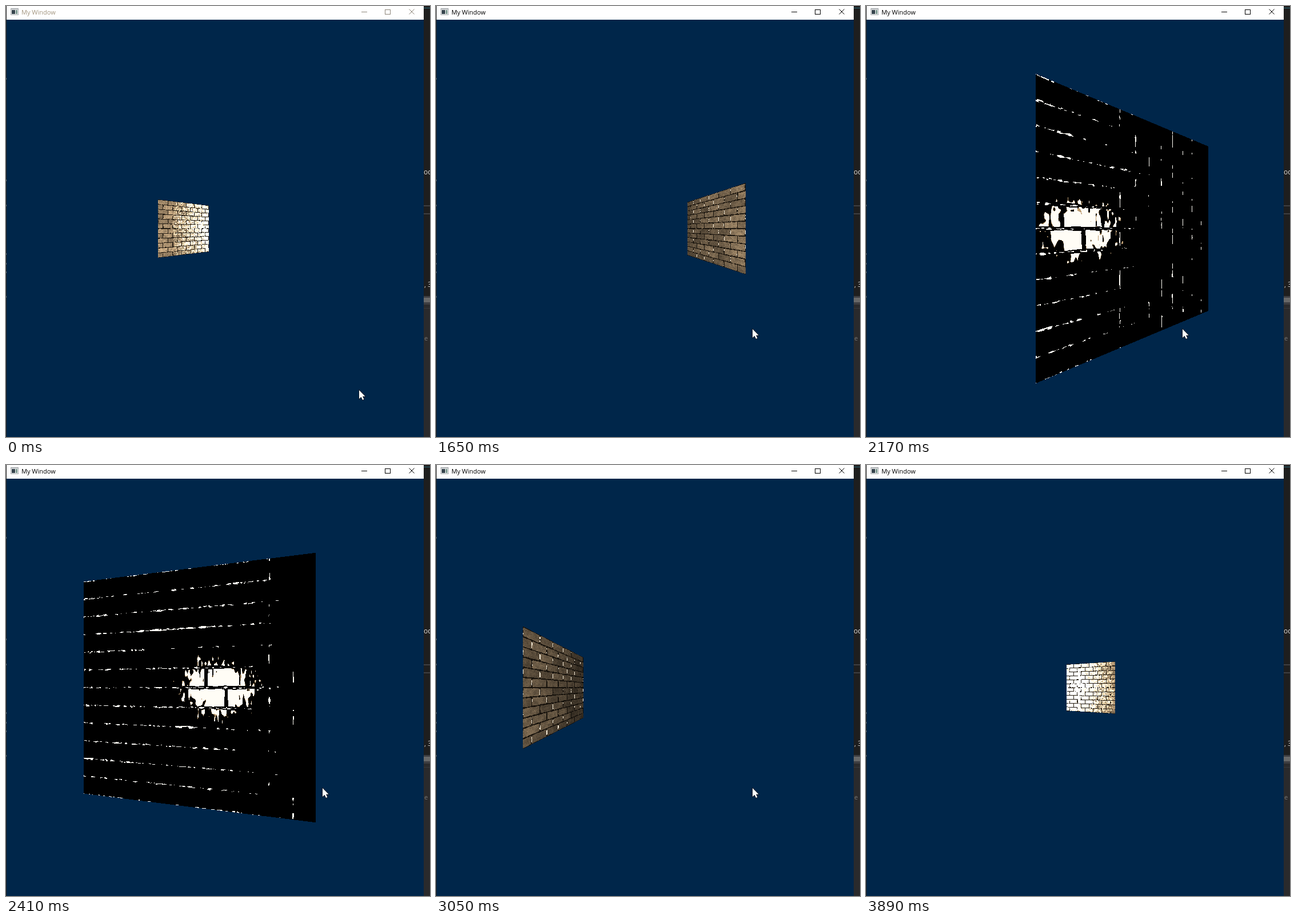
Animation of 742x755 px, one loop 4.21 s. Source, as an HTML page with a canvas:

```html
<!DOCTYPE html>
<html lang="en">
<head>
<meta charset="utf-8">
<title>My Window</title>
<style>
html, body { margin: 0; width: 100%; height: 100%; overflow: hidden; background: #1e1e1e; }
canvas { display: block; }
</style>
</head>
<body>
<canvas id="stage" width="742" height="755"></canvas>
<script>
const W = 742, H = 755, LOOP = 4210, TITLE = 24;
const ctx = document.getElementById('stage').getContext('2d', { willReadFrequently: true });

// Camera: centre of view, focal length; the wall orbits an axis in front of it.
const CX = 365, CY = 390, FOCAL = 211, AXIS = 3, ORBIT = 2;
const ROWS = 12, BRICKS = 6;

// Runs of held poses: first time, last time, count, first angle, last angle.
const RUNS = [
  [0, 0, 1, -33.2, -33.2], [390, 460, 2, -30.5, -28],
  [940, 1090, 3, -18.7, 0], [1170, 1410, 4, 11.5, 45.7],
  [1480, 1650, 3, 55, 73], [1710, 1940, 4, 86, 125.5],
  [2020, 2170, 3, 137, 159.9], [2260, 2260, 1, 177, 177],
  [2410, 2580, 3, 187, 205.5], [2730, 2730, 1, 228.9, 228.9],
  [2820, 3050, 4, 239, 269], [3130, 3190, 2, 283, 297.3],
  [3270, 3730, 7, 306, 360.7], [3810, 3890, 2, 369, 377.6]
];
const poses = RUNS.flatMap(([t0, t1, n, a0, a1]) => Array.from({ length: n }, (_, i) => {
  const k = n > 1 ? i / (n - 1) : 0;
  return { time: t0 + (t1 - t0) * k, angle: a0 + (a1 - a0) * k };
}));
// Moments when only the pointer or the title bar changes.
for (const time of [70, 140, 780]) {
  const i = poses.findIndex(p => p.time > time);
  poses.splice(i, 0, { time, angle: poses[i - 1].angle });
}

const clamp = (v, lo = 0, hi = 1) => Math.min(hi, Math.max(lo, v));
const mix = (a, b, k) => a + (b - a) * k;

function hash(x, y) {
  let h = Math.imul(x, 374761393) ^ Math.imul(y, 668265263);
  h = Math.imul(h ^ (h >>> 13), 1274126177);
  return ((h ^ (h >>> 16)) >>> 0) / 4294967296;
}

function noise(x, y) {
  const ix = Math.floor(x), iy = Math.floor(y), fx = x - ix, fy = y - iy;
  return mix(mix(hash(ix, iy), hash(ix + 1, iy), fx),
             mix(hash(ix, iy + 1), hash(ix + 1, iy + 1), fx), fy);
}

// Brick pattern at u,v: distances to the joints in units of one row height.
function brickAt(u, v) {
  const wob = (noise(u * 60, v * 60) - 0.5) * 0.08;
  const row = clamp(Math.floor(v * ROWS), 0, ROWS - 1);
  const along = u * BRICKS - (row % 2 ? 0.47 : -0.02);
  const col = Math.floor(along);
  const fx = along - col, fy = v * ROWS - row;
  return {
    row, col, fy,
    side: Math.min(fx, 1 - fx) * 2 + wob,
    bed: Math.min(fy, 1 - fy) + wob,
    grain: hash(Math.floor(u * 300), Math.floor(v * 300)),
    blot: noise(u * 45, v * 45),
    scratch: noise(u * 130, v * 55)
  };
}

function shadeFront(b, diffuse, glow, facing) {
  const tone = 0.92 + 0.35 * (hash(b.col + 40, b.row) - 0.5);
  if (b.side < 0.06 && facing < 0.55 && diffuse > 0.2 && b.bed > 0.2 &&
      hash(b.col, b.row + 90) > 0.5 && b.blot > 0.35) return [245, 235, 215];
  if (b.bed < 0.065 || b.side < 0.065) {
    const k = diffuse * 36 + clamp(glow - 1.5) * 50;
    return [k, k * 0.8, k * 0.55];
  }
  const k = 1.1 * diffuse ** 1.3 * tone * (0.72 + 0.3 * b.grain + 0.3 * b.blot);
  const shine = glow > 0 ? Math.max(0, glow + (b.grain + b.blot - 1) * 0.9) * 210 : 0;
  return [158 * k + shine, 134 * k + shine * 0.93, 103 * k + shine * 0.8];
}

function shadeBack(b, x, y) {
  const pale = [255, 253, 246];
  const r = Math.hypot((x - 372) / 50, (y - 390) / 38);
  if (r < 1.9 && b.bed > 0.08 && b.side > 0.09) {
    const lit = 1.25 - 0.65 * r - (b.scratch * 0.7 + b.blot * 0.3);
    if (lit > 0.03) return pale;
    if (lit > 0) return [190, 158, 115];
  }
  const streak = noise(b.col * 5 + b.side * 8, b.row * 7 + (b.fy > 0.5 ? 3 : 0));
  if (b.bed < 0.03 && x < 480 && streak + (b.scratch - 0.5) * 0.8 > 0.55 + Math.max(0, x - 340) / 350)
    return pale;
  if (b.side < 0.03 && x > 440 && b.scratch > 0.5 && hash(b.col + 7, b.row + 31) > 0.45) return pale;
  return [0, 0, 0];
}

function drawWall(angle) {
  const a = angle * Math.PI / 180, sin = Math.sin(a), cos = Math.cos(a);
  const back = ORBIT + AXIS * cos < 0;
  const image = ctx.getImageData(0, 0, W, H), px = image.data;
  for (let x = 1; x < 731; x++) {
    const k = (x + 0.5 - CX) / FOCAL;
    const s = (k * (AXIS + ORBIT * cos) - ORBIT * sin) / (cos + k * sin);
    const depth = AXIS + ORBIT * cos - s * sin;
    if (!(Math.abs(s) <= 1) || depth <= 0) continue;
    const wx = k * depth, half = FOCAL / depth;
    const diffuse = clamp((wx * sin + depth * cos) / Math.hypot(wx, depth));
    const top = Math.max(TITLE, Math.round(CY - half)), end = Math.min(H, Math.round(CY + half));
    for (let y = top; y < end; y++) {
      const wy = (y + 0.5 - CY) / half;
      const b = brickAt((s + 1) / 2, (wy + 1) / 2);
      const glow = Math.max(0, 1.9 - 1.25 * Math.hypot(wx, wy * 0.6)) * Math.max(0, cos);
      const c = back ? shadeBack(b, x, y) : shadeFront(b, diffuse, glow, Math.abs(cos));
      const i = (y * W + x) * 4;
      px[i] = c[0]; px[i + 1] = c[1]; px[i + 2] = c[2];
    }
  }
  ctx.putImageData(image, 0, 0);
}

function rect(color, x, y, w, h) {
  ctx.fillStyle = color;
  ctx.fillRect(x, y, w, h);
}

function label(text, x, y, size, color) {
  ctx.font = `${size}px "Open Sans", sans-serif`;
  ctx.fillStyle = color;
  ctx.fillText(text, x, y);
}

function drawDesktop() {
  rect('#1e1e1e', 0, 0, W, H);
  rect('#2f6f80', 731, 3, 11, 1);
  rect('#3f3f42', 731, 349, 11, 2);
  rect('#3f3f42', 731, 363, 11, 2);
  rect('#3e3e42', 731, 508, 11, 15);
  rect('#686868', 731, 511, 11, 8);
  rect('#2a2a2c', 731, 523, 11, 232);
  rect('#3a3a3d', 731, 529, 11, 1);
  label('od', 731, 295, 12, '#dcdcdc');
  label(', 3', 732, 492, 12, '#c8c8c8');
  label('e', 732, 586, 11, '#777');
}

function drawWindow(active) {
  const ink = active ? '#000' : '#8c8579';
  rect('#00264a', 1, TITLE, 730, H - TITLE);
  rect('#fff', 1, 0, 730, TITLE);
  rect('#a9adb0', 8, 4, 14, 12);
  rect('#f4f4f4', 9, 6, 12, 9);
  rect('#35434c', 10, 7, 6, 7);
  rect('#7d9a91', 17, 7, 3, 7);
  label('My Window', 27, 15, 11, active ? '#000' : '#a2957f');
  rect(ink, 622, 10, 10, 1);
  ctx.strokeStyle = ink;
  ctx.lineWidth = 1;
  ctx.strokeRect(663.5, 6.5, 9, 8);
  ctx.beginPath();
  ctx.moveTo(705.5, 5.5); ctx.lineTo(714.5, 14.5);
  ctx.moveTo(714.5, 5.5); ctx.lineTo(705.5, 14.5);
  ctx.stroke();
  for (const y of [126, 304, 348, 433, 450, 465, 508]) rect('#66685f', 0, y, 1, 3);
}

function pointerAt(t) {
  if (t < 70) return [618, 673];
  if (t < 140) return [588, 622];
  if (t < 390) return [555, 567];
  const k = clamp((t - 3270) / 390);
  return [mix(554, 700, k), mix(566, 760, k)];
}

function drawPointer(t) {
  const [x, y] = pointerAt(t);
  if (y > H) return;
  ctx.save();
  ctx.translate(x, y);
  ctx.beginPath();
  for (const [px, py] of [[0, 0], [0, 15], [3.5, 11.7], [6, 17], [8.4, 16], [6, 10.8], [10.5, 10.8]])
    ctx.lineTo(px, py);
  ctx.closePath();
  ctx.strokeStyle = '#111';
  ctx.lineWidth = 1.2;
  ctx.stroke();
  ctx.fillStyle = '#fff';
  ctx.fill();
  ctx.restore();
}

const start = performance.now();
let shown = null;

function tick() {
  const t = (performance.now() - start) % LOOP;
  const pose = poses.findLast(p => p.time <= t + 0.01) || poses[0];
  if (pose !== shown) {
    shown = pose;
    drawDesktop();
    drawWindow(pose.time >= 70);
    drawWall(pose.angle);
    drawPointer(pose.time);
  }
  requestAnimationFrame(tick);
}
tick();
</script>
</body>
</html>
```
